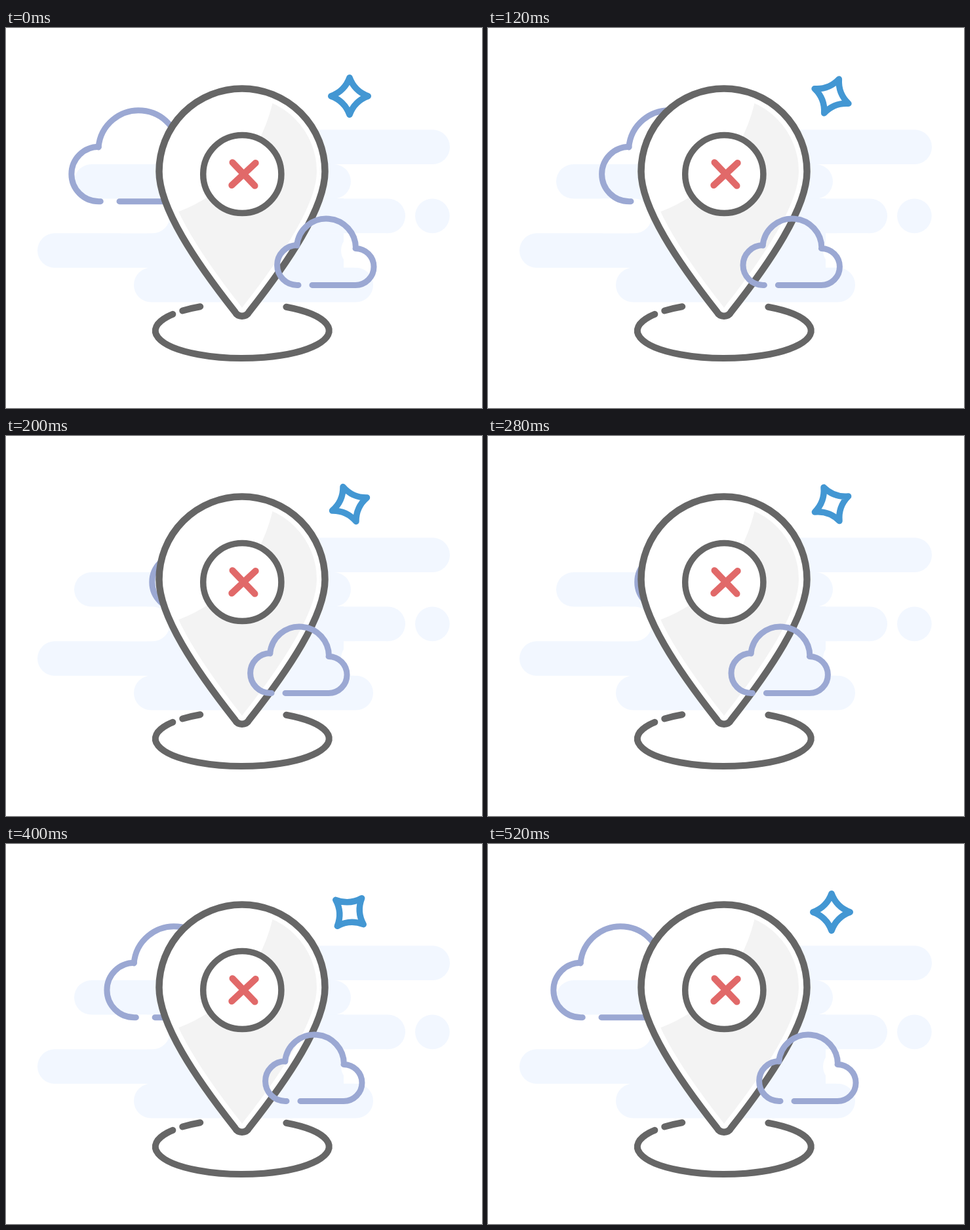
Write an HTML page with a canvas that moves like this. It is 726 px wide and 580 px high and loops after 560 ms.

```html
<!DOCTYPE html>
<html lang="en">
<head>
<meta charset="utf-8">
<title>Location not found</title>
<style>
  html, body { margin: 0; width: 100%; height: 100%; overflow: hidden; background: #fff; }
  canvas { display: block; width: 726px; height: 580px; }
</style>
</head>
<body>
<canvas id="stage" width="726" height="580"></canvas>
<script>
const ctx = document.getElementById('stage').getContext('2d');
const LOOP = 560, STEP = 40, HALF_SWING = 244;
const HAZE = '#f2f7ff', GRAY = '#666', LILAC = '#9ba8d3', BLUE = '#4397d3', RED = '#e16969';
const rad = degrees => degrees * Math.PI / 180;

function stroke(color, width) {
  ctx.strokeStyle = color;
  ctx.lineWidth = width;
  ctx.stroke();
}

function pill(left, right, y, color = HAZE) {
  ctx.fillStyle = color;
  ctx.beginPath();
  ctx.roundRect(left, y, right - left, 52.7, 26.35);
  ctx.fill();
}

function drawHaze() {
  pill(400, 677, 155.2);
  pill(104, 526, 207.9);
  pill(624, 676.7, 260.6);
  pill(195, 560, 365.8);
  ctx.fillStyle = HAZE;
  ctx.fillRect(215, 260, 300, 106.5);
  pill(300, 609, 260.6);
  pill(48, 400, 313.2);
  // Rounded notches on either side of the joined bands
  pill(150, 250, 260.6, '#fff');
  pill(511, 600, 313.2, '#fff');
}

function drawCloud(x, y, scale) {
  ctx.save();
  ctx.translate(x, y);
  ctx.scale(scale, scale);
  ctx.beginPath();
  ctx.moveTo(2, 30.4);
  ctx.arc(0, 0, 30.4, rad(90), rad(270));
  ctx.arc(44.5, -26, 45, rad(185), 0);
  ctx.arc(89, 2.4, 28, rad(-90), rad(90));
  ctx.lineTo(23, 30.4);
  ctx.restore();
  stroke(LILAC, 9);
}

function pinPath() {
  ctx.beginPath();
  ctx.arc(360, 219, 126.5, Math.PI, 0);
  ctx.bezierCurveTo(486.5, 275, 430, 358, 371, 433);
  ctx.bezierCurveTo(366, 442, 354, 442, 349, 433);
  ctx.bezierCurveTo(290, 358, 233.5, 275, 233.5, 219);
  ctx.closePath();
}

function drawPin() {
  ctx.save();
  pinPath();
  ctx.clip();
  ctx.fillStyle = '#fff';
  ctx.fill();
  ctx.beginPath();
  ctx.moveTo(407, 100);
  ctx.lineTo(406, 117);
  ctx.bezierCurveTo(385, 200, 330, 255, 264, 280);
  ctx.lineTo(230, 292);
  ctx.lineTo(230, 500);
  ctx.lineTo(600, 500);
  ctx.lineTo(600, 100);
  ctx.fillStyle = '#f3f3f3';
  ctx.fill();
  pinPath();
  stroke('#fff', 25);
  ctx.restore();

  pinPath();
  stroke(GRAY, 10.5);

  ctx.beginPath();
  ctx.arc(360.3, 223, 59.6, 0, rad(360));
  ctx.fillStyle = '#fff';
  ctx.fill();
  stroke(GRAY, 9.5);

  ctx.beginPath();
  ctx.moveTo(345.5, 205.2);
  ctx.lineTo(379.5, 240.8);
  ctx.moveTo(380.7, 206);
  ctx.lineTo(344.3, 240);
  stroke(RED, 10);
}

function drawGroundRing() {
  for (const [from, to] of [[-59.6, 216.9], [226.6, 241.1]]) {
    ctx.beginPath();
    ctx.ellipse(360.3, 462, 132.5, 42, 0, rad(from), rad(to));
    stroke(GRAY, 10);
  }
}

function drawStar(angle) {
  ctx.save();
  ctx.translate(524, 104);
  ctx.rotate(rad(angle));
  ctx.beginPath();
  ctx.moveTo(0, -28.3);
  for (let i = 0; i < 4; i++) {
    ctx.quadraticCurveTo(7.5, -7.5, 28.3, 0);
    ctx.rotate(rad(90));
  }
  ctx.closePath();
  ctx.restore();
  stroke(BLUE, 9.5);
}

function draw(now) {
  const time = Math.floor(now % LOOP / STEP) * STEP;
  const swing = Math.max(0, 1 - Math.abs(time / HALF_SWING - 1));
  ctx.fillStyle = '#fff';
  ctx.fillRect(0, 0, 726, 580);
  drawHaze();
  drawCloud(141.5 + 150 * swing, 223, 1.37);
  drawPin();
  drawGroundRing();
  drawCloud(444 - 50 * swing, 362, 1);
  drawStar(-135 * swing);
}

ctx.lineCap = ctx.lineJoin = 'round';
const start = performance.now();
function tick() {
  draw(performance.now() - start);
  requestAnimationFrame(tick);
}
tick();
</script>
</body>
</html>
```
